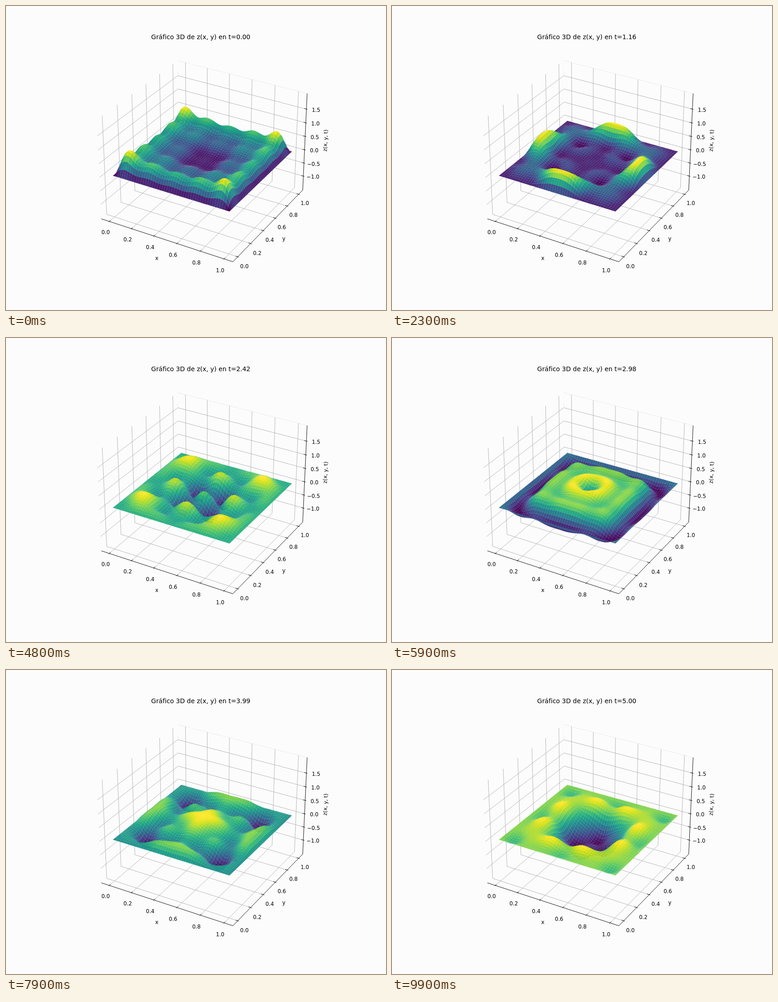
Animation of 837 by 669 pixels, one loop 10000 ms. Source, as an HTML page with a canvas:

```html
<!DOCTYPE html>
<html lang="es">
<head>
<meta charset="utf-8">
<title>Membrana vibrante</title>
<style>
html, body { margin: 0; width: 100%; height: 100%; overflow: hidden; background: #fcfcfc; }
canvas { display: block; width: 837px; height: 669px; }
</style>
</head>
<body>
<canvas id="stage" width="837" height="669"></canvas>
<script>
const W = 837, H = 669, FRAMES = 100, STEP = 100, T_END = 5;
const FONT = '"DejaVu Sans", Verdana, sans-serif';
const ctx = document.getElementById('stage').getContext('2d');

function layer(w, h) {
  const c = document.createElement('canvas');
  c.width = w;
  c.height = h;
  return c;
}

// ---- camera: elevation 30°, azimuth -60°, distance 10 ----
const Z_MIN = -1.47, Z_MAX = 1.99, Z_MID = (Z_MIN + Z_MAX) / 2;
const BOX = 1.142828, SX = BOX / 1.1, SZ = BOX * 0.75 / (Z_MAX - Z_MIN);
const EL = Math.PI / 6, AZ = -Math.PI / 3;
const ce = Math.cos(EL), se = Math.sin(EL), ca = Math.cos(AZ), sa = Math.sin(AZ);

function project(x, y, z) {
  const a = (x - 0.5) * SX, b = (y - 0.5) * SX, c = (z - Z_MID) * SZ;
  const right = -sa * a + ca * b;
  const up = -se * ca * a - se * sa * b + ce * c;
  const w = 10 - (ce * ca * a + ce * sa * b + se * c);
  return { x: 435.9 + right / w * 2787, y: 330.9 - up / w * 2784.4, w };
}

// ---- membrane: cone-shaped start, odd sine modes up to 9 ----
const N = 50, MODES = [1, 3, 5, 7, 9];

const amp = MODES.map(m => MODES.map(n => {
  const K = 100, h = 0.5 / K;
  let sum = 0;
  for (let i = 0; i < K; i++) {
    const u = (i + 0.5) * h, cu = Math.cos(m * Math.PI * u);
    for (let j = 0; j < K; j++) {
      const v = (j + 0.5) * h;
      sum += Math.hypot(u, v) * cu * Math.cos(n * Math.PI * v);
    }
  }
  return 16 * sum * h * h;
}));

const grid = Array.from({ length: N }, (_, i) => i / (N - 1));
const basis = MODES.map(m => grid.map(x => Math.cos(m * Math.PI * (x - 0.5))));

function heights(t) {
  const q = amp.map((row, a) => row.map((v, b) =>
    v * Math.cos(Math.PI * Math.hypot(MODES[a], MODES[b]) * t)));
  return grid.map((_, i) => {
    const col = MODES.map((_, b) =>
      MODES.reduce((s, _, a) => s + q[a][b] * basis[a][i], 0));
    return grid.map((_, j) => col.reduce((s, v, b) => s + v * basis[b][j], 0));
  });
}

// ---- colours ----
const RAMP = ('440154 48186a 472d7b 424086 3b528b 33638d 2c728e 26828e 21918c ' +
  '1fa088 28ae80 3fbc73 5ec962 84d44b addc30 d8e219 fde725').split(' ')
  .map(s => [0, 2, 4].map(k => parseInt(s.slice(k, k + 2), 16)));

function colour(v) {
  const p = Math.min(Math.max(v, 0), 1) * (RAMP.length - 1);
  const i = Math.min(Math.floor(p), RAMP.length - 2), f = p - i;
  const rgb = RAMP[i].map((c, k) => Math.round(c + (RAMP[i + 1][k] - c) * f));
  return `rgb(${rgb})`;
}

// ---- drawing helpers ----
function line(g, pts, stroke, width = 0.93) {
  g.strokeStyle = stroke;
  g.lineWidth = width;
  g.lineJoin = 'round';
  g.beginPath();
  pts.forEach(p => g.lineTo(p.x, p.y));
  g.stroke();
}

function label(g, str, x, y, size = 11.62) {
  g.font = `${size}px ${FONT}`;
  g.textAlign = 'center';
  g.textBaseline = 'alphabetic';
  g.fillStyle = '#000';
  g.fillText(str, x, y);
}

function tick(g, a, b) {
  line(g, [a, b], '#000');
}

function drawAxes(g) {
  const lo = 0.5 - 0.55 * 25 / 24, hi = 1 - lo;
  const half = (Z_MAX - Z_MIN) / 2 * 25 / 24, zl = Z_MID - half, zh = Z_MID + half;
  const out = 1.1 / 120, inn = 1.1 / 60, DIGIT = 4.24;
  const P = project;

  g.fillStyle = '#fcfcfc';
  g.fillRect(0, 0, W, H);

  line(g, [P(lo, hi, zh), P(hi, hi, zh)], '#ebebeb');
  line(g, [{ x: 379, y: 143 }, { x: 379, y: 152 }], '#ebebeb');

  const units = [0, 0.2, 0.4, 0.6, 0.8, 1], levels = [-1, -0.5, 0, 0.5, 1, 1.5];
  const GREY = '#b0b0b0';
  units.forEach(v => line(g, [P(v, lo, zl), P(v, hi, zl), P(v, hi, zh)], GREY));
  units.forEach(v => line(g, [P(hi, v, zl), P(lo, v, zl), P(lo, v, zh)], GREY));
  levels.forEach(v => line(g, [P(lo, lo, v), P(lo, hi, v), P(hi, hi, v)], GREY));

  line(g, [P(lo, lo, zl), P(hi, lo, zl)], '#000');
  line(g, [P(hi, lo, zl), P(hi, hi, zl)], '#000');
  line(g, [P(hi, hi, zl), P(hi, hi, zh)], '#000');

  units.forEach(v => {
    const str = v.toFixed(1), a = P(v, lo, zl), b = P(hi, v, zl);
    tick(g, P(v, lo - out, zl), P(v, lo + inn, zl));
    tick(g, P(hi + out, v, zl), P(hi - inn, v, zl));
    label(g, str, a.x - 82 / a.w, a.y + 240 / a.w + DIGIT);
    label(g, str, b.x + 141 / b.w, b.y + 202 / b.w + DIGIT);
  });
  levels.forEach(v => {
    const p = P(hi, hi, v);
    tick(g, P(hi + out, hi, v), P(hi - inn, hi, v));
    label(g, v.toFixed(1).replace('-', '\u2212'), p.x + 21.2, p.y + 1.8 + DIGIT);
  });

  label(g, 'x', 332.3, 558.6);
  label(g, 'y', 612, 515.6);
  g.save();
  g.translate(704, 296);
  g.rotate(-87.6 * Math.PI / 180);
  label(g, 'z(x, y, t)', 0, 3.4);
  g.restore();
}

// The surface is filled at a larger size and reduced, which softens its seams.
const back = layer(W, H), big = layer(1000, 800);
const sg = big.getContext('2d');

function drawSurface(t) {
  const z = heights(t);
  const pts = z.map((row, i) => row.map((v, j) => project(grid[i], grid[j], v)));
  const cells = [];
  let min = Infinity, max = -Infinity;
  for (let i = 0; i < N - 1; i++) {
    for (let j = 0; j < N - 1; j++) {
      const c = [pts[i][j], pts[i + 1][j], pts[i + 1][j + 1], pts[i][j + 1]];
      const mean = (z[i][j] + z[i + 1][j] + z[i + 1][j + 1] + z[i][j + 1]) / 4;
      min = Math.min(min, mean);
      max = Math.max(max, mean);
      cells.push({ c, mean, depth: c.reduce((s, p) => s - 1 / p.w, 0) });
    }
  }
  cells.sort((a, b) => b.depth - a.depth);

  sg.setTransform(1, 0, 0, 1, 0, 0);
  sg.clearRect(0, 0, big.width, big.height);
  sg.scale(big.width / W, big.height / H);
  for (const { c, mean } of cells) {
    sg.fillStyle = colour((mean - min) / (max - min));
    sg.beginPath();
    c.forEach(p => sg.lineTo(p.x, p.y));
    sg.closePath();
    sg.fill();
  }
}

function render(k) {
  const t = k * T_END / (FRAMES - 1);
  ctx.drawImage(back, 0, 0);
  drawSurface(t);
  ctx.imageSmoothingEnabled = true;
  ctx.imageSmoothingQuality = 'high';
  ctx.drawImage(big, 0, 0, W, H);
  label(ctx, `Gráfico 3D de z(x, y) en t=${t.toFixed(2)}`, 429, 73.3, 13.95);
}

drawAxes(back.getContext('2d'));
const start = performance.now();
let shown = -1;

function loop() {
  const k = Math.floor((performance.now() - start) / STEP) % FRAMES;
  if (k !== shown) {
    shown = k;
    render(k);
  }
  requestAnimationFrame(loop);
}
loop();
</script>
</body>
</html>
```
